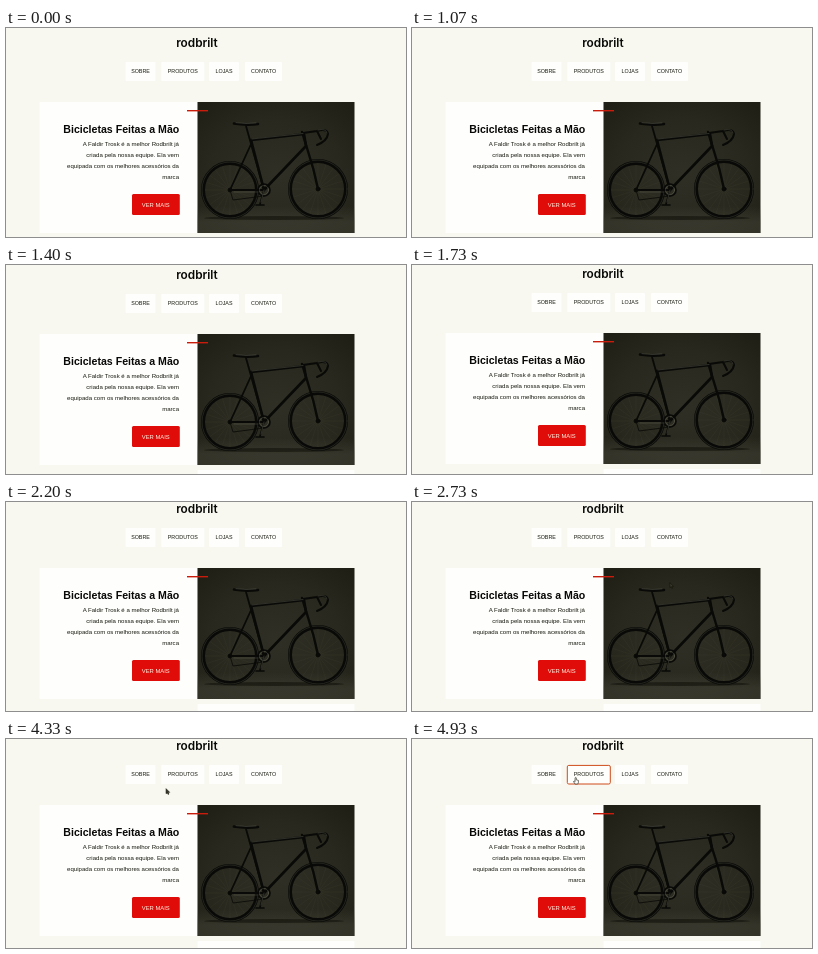
Animation of 400 by 209 pixels, one loop 4.99 s. Source, as an HTML page:

```html
<!DOCTYPE html>
<html lang="pt-BR">
<head>
<meta charset="utf-8">
<title>rodbrilt</title>
<style>
  html, body { margin: 0; width: 100%; height: 100%; overflow: hidden; background: #f8f8f1; }
  svg { display: block; width: 100vw; height: 100vh; }
  text { font-family: "Liberation Sans", Arial, sans-serif; fill: #17170f; }
  .brand { font: 600 11.8px Inter, sans-serif; text-anchor: middle; fill: #080806; }
  .nav text { font-size: 5.35px; text-anchor: middle; }
  .nav rect { fill: #fefefc; }
  .copy text { font-size: 6.07px; text-anchor: end; }
  .copy .heading { font-size: 10.6px; font-weight: bold; fill: #080806; }
  .copy .cta { font-size: 5.85px; text-anchor: middle; fill: #fff4e4; }
  .bike { fill: none; stroke-linecap: round; stroke-linejoin: round; }
</style>
</head>
<body>
<svg viewBox="0 0 400 209" preserveAspectRatio="none">
  <defs>
    <radialGradient id="studio" cx=".5" cy=".55" r=".7">
      <stop offset="0" stop-color="#2f2f25"/>
      <stop offset=".6" stop-color="#28281e"/>
      <stop offset="1" stop-color="#1f1f15"/>
    </radialGradient>
    <linearGradient id="floor" x2="0" y2="1">
      <stop offset="0" stop-color="#45453a" stop-opacity="0"/>
      <stop offset=".6" stop-color="#45453a" stop-opacity=".5"/>
      <stop offset="1" stop-color="#45453a" stop-opacity=".5"/>
    </linearGradient>
  </defs>

  <g id="page">
    <text class="brand" x="191" y="18.5">rodbrilt</text>
    <g class="nav" id="nav"></g>

    <rect x="33.5" y="74" width="158" height="131" fill="#fefefc"/>
    <rect x="191.5" y="210" width="157" height="131" fill="#fefefc"/>
    <rect x="191.5" y="74" width="157" height="131" fill="url(#studio)"/>
    <rect x="191.5" y="178" width="157" height="27" fill="url(#floor)"/>
    <ellipse cx="268" cy="190" rx="70" ry="2" fill="#11110b" opacity=".6"/>

    <g class="bike" stroke="#090907">
      <g id="wheels"></g>
      <path d="M245 112L298 106L300 118L258 162Z" stroke-width="2.6"/>
      <path d="M240 98L258 162M224 162L246 114M224 162L258 162" stroke-width="1.8"/>
      <path d="M296 104L301 120Q308 141 312 161" stroke-width="2.4"/>
      <path d="M228 95.5Q240 97.5 252 96" stroke-width="2.6"/>
      <path d="M297 105L311 103Q321 100 322 106Q321 113 311 117M311 103L315 111" stroke-width="2"/>
      <path d="M258 162L254 176M250 177L258 177" stroke-width="1.6"/>
      <circle cx="258" cy="162" r="6" stroke-width="1.6"/>
      <path d="M224 162L227 172L258 168" stroke-width=".8"/>
      <g stroke="#77776a" stroke-width=".5" opacity=".7">
        <path d="M246 111L297 105.5M230 94.7Q240 96.3 250 95M312 102Q320 100 321 105"/>
        <circle cx="258" cy="162" r="4.5"/>
        <path d="M258 162L255 174M228 164L252 164"/>
      </g>
    </g>

    <rect x="181" y="82" width="21" height="1.4" fill="#c91c0c"/>

    <g class="copy">
      <text class="heading" x="173.3" y="104.8">Bicicletas Feitas a Mão</text>
      <text x="173" y="118.3">A Faldir Trosk é a melhor Rodbrilt já</text>
      <text x="173" y="129.2">criada pela nossa equipe. Ela vem</text>
      <text x="173" y="140.1">equipada com os melhores acessórios da</text>
      <text x="173" y="151">marca</text>
      <rect x="126" y="166" width="47.8" height="21" rx="1.5" fill="#e00c0a"/>
      <text class="cta" x="149.8" y="178.7">VER MAIS</text>
    </g>
  </g>

  <rect id="hover" rx="1.5" fill="none" stroke="#cf4a18"/>
  <g id="cursor" stroke="#15150a" stroke-width=".6" stroke-linejoin="round">
    <path id="arrow" d="M0 0V5L1.2 4L2 5.8L2.8 5.4L2 3.7H3.6Z" fill="#38382f"/>
    <path id="hand" d="M-.6 .3Q0 -.5 .6 .3V2.3L2.7 2.9V5L2 6.5H-.7L-2.2 4L-1.5 3.5L-.6 4.2Z" fill="#fff"/>
  </g>
</svg>

<script>
const LOOP = 4990, STEP = 1000 / 15;
const NAV_TOP = 34, NAV_HEIGHT = 19;
const $ = id => document.getElementById(id);

// Key rows are [time, ...values].
const scrollKeys = [[1070, 0], [1400, 5], [1730, 6], [2130, 8]];
const cursorKeys = [
  [2200, 402, 122], [2700, 262, 82], [2930, 233.5, 73], [4130, 233.5, 73],
  [4400, 136, 42], [4600, 138, 40], [4870, 163.7, 38.5]
];
const links = [
  { label: "SOBRE", x: 119.5, w: 30 },
  { label: "PRODUTOS", x: 155.3, w: 43 },
  { label: "LOJAS", x: 203, w: 30 },
  { label: "CONTATO", x: 239, w: 37 }
];

function sample(keys, t) {
  if (t <= keys[0][0]) return keys[0].slice(1);
  const next = keys.findIndex(key => key[0] > t);
  if (next < 0) return keys[keys.length - 1].slice(1);
  const a = keys[next - 1], b = keys[next];
  const p = (t - a[0]) / (b[0] - a[0]);
  return a.slice(1).map((v, i) => v + (b[i + 1] - v) * p);
}

function setAttrs(id, attrs) {
  for (const name in attrs) $(id).setAttribute(name, attrs[name]);
}

function wheel(cx, cy, r) {
  let spokes = "";
  for (let i = 0; i < 20; i++) {
    const angle = i * Math.PI / 10;
    spokes += `M${cx} ${cy}l${r * Math.cos(angle)} ${r * Math.sin(angle)}`;
  }
  return `<path d="${spokes}" stroke="#55554a" stroke-width=".3" opacity=".4"/>
    <circle cx="${cx}" cy="${cy}" r="${r}" stroke-width="4"/>
    <circle cx="${cx}" cy="${cy}" r="${r + 1}" stroke="#4a4a40" stroke-width=".4"/>
    <circle cx="${cx}" cy="${cy}" r="2" fill="#090907"/>`;
}

$("wheels").innerHTML = wheel(224, 162, 27) + wheel(312, 161, 28);

$("nav").innerHTML = links.map(({ label, x, w }) =>
  `<rect x="${x}" y="${NAV_TOP}" width="${w}" height="${NAV_HEIGHT}" rx="1"/>
   <text x="${x + w / 2}" y="45.3">${label}</text>`).join("");

function render(t) {
  const scroll = Math.round(sample(scrollKeys, t)[0]);
  const [x, y] = sample(cursorKeys, t);
  const top = NAV_TOP - scroll;
  const hovered = y > top && y < top + NAV_HEIGHT &&
    links.find(link => x > link.x && x < link.x + link.w);

  setAttrs("page", { transform: `translate(0 ${-scroll})` });
  setAttrs("cursor", { transform: `translate(${x} ${y})`, opacity: t > 2230 ? 1 : 0 });
  setAttrs("arrow", { opacity: hovered ? 0 : 1 });
  setAttrs("hand", { opacity: hovered ? 1 : 0 });
  setAttrs("hover", { opacity: hovered ? 1 : 0 });
  if (hovered) {
    setAttrs("hover", { x: hovered.x, y: top + 0.4, width: hovered.w, height: NAV_HEIGHT - 0.4 });
  }
}

const start = performance.now();
function tick() {
  const t = (performance.now() - start) % LOOP;
  render(Math.floor(t / STEP + 0.1) * STEP);
  requestAnimationFrame(tick);
}
render(0);
requestAnimationFrame(tick);
</script>
</body>
</html>
```
